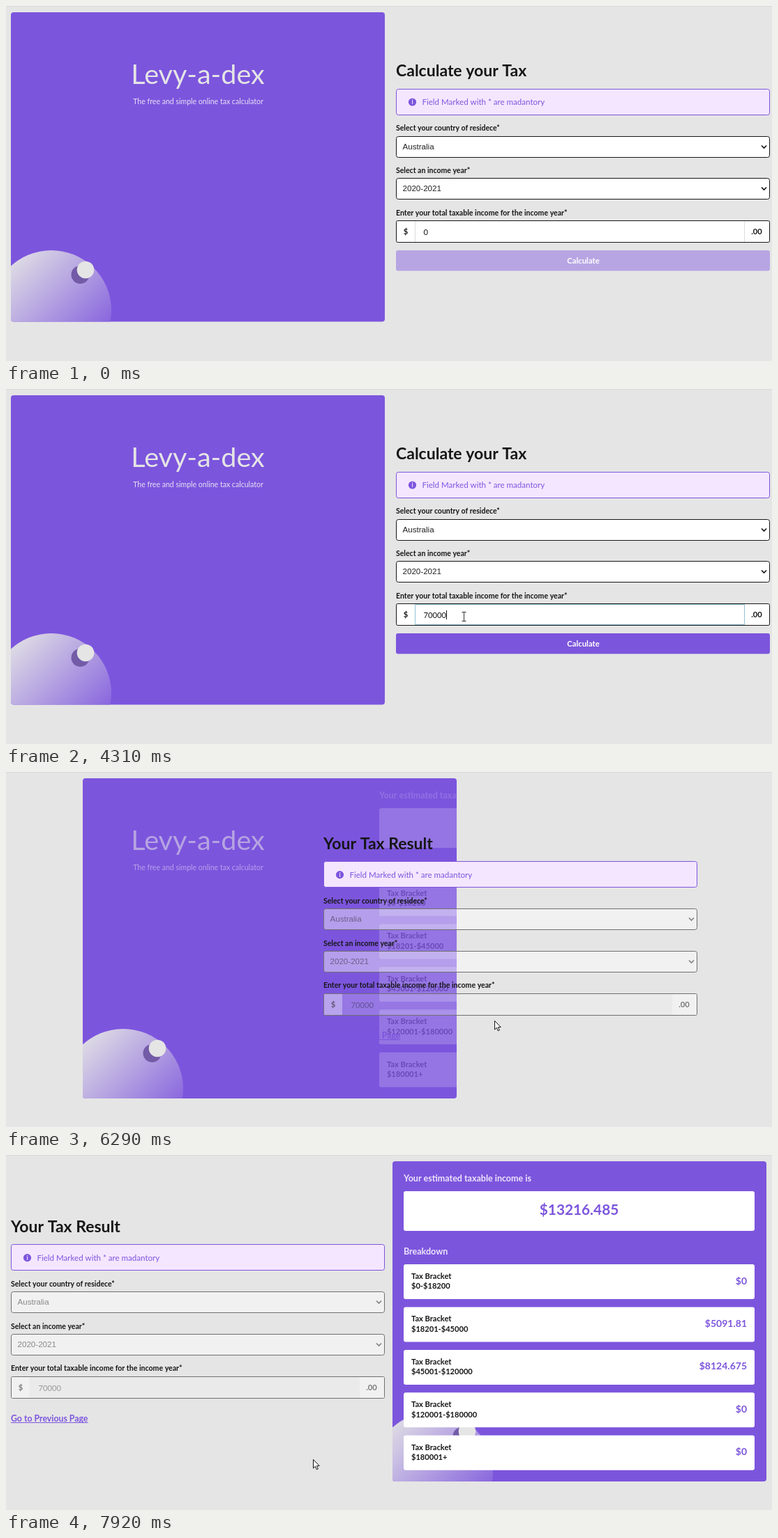
These frames come from a looping animation (1098x510 px, 7990 ms). An HTML page with a canvas:

```html
<!DOCTYPE html>
<html lang="en">
<head>
<meta charset="utf-8">
<title>Tax calculator</title>
<style>
html, body { margin: 0; width: 100%; height: 100%; overflow: hidden; background: #e5e5e5; }
canvas { display: block; }
</style>
</head>
<body>
<canvas id="stage" width="1098" height="510"></canvas>
<script>
const stage = document.getElementById('stage');
const layer = document.createElement('canvas');
layer.width = stage.width;
layer.height = stage.height;
let ctx = stage.getContext('2d');

const LOOP = 7990;
const PURPLE = '#7c55dd', INK = '#161616', GREY = '#e5e5e5';
const SLIDE = { start: 5951, length: 1107 };
const W = 536;
const DIM = .5;

const clamp = v => Math.max(0, Math.min(1, v));
const mix = (a, b, k) => a + (b - a) * k;
const ease = k => k < .5 ? 2 * k * k : 1 - 2 * (1 - k) * (1 - k);
const span = (t, a, b) => clamp((t - a) / (b - a));
const tick = t => 6290 + Math.floor((t - 6290) / 70) * 70;

function text(str, x, y, size, o = {}) {
  ctx.font = `${o.weight || 400} ${size}px ${o.family || 'Lato, sans-serif'}`;
  ctx.textAlign = o.align || 'left';
  ctx.fillStyle = o.color || INK;
  ctx.fillText(str, x, y + size * .36);
}
const bold = (str, x, y, size, color, align) => text(str, x, y, size, { weight: 700, color, align });

function box(x, y, w, h, r, fill, stroke) {
  ctx.beginPath();
  ctx.roundRect(x, y, w, h, r);
  if (fill) { ctx.fillStyle = fill; ctx.fill(); }
  if (stroke) { ctx.strokeStyle = stroke; ctx.lineWidth = 1; ctx.stroke(); }
}
// Box whose one pixel border lies inside the given size.
const framed = (x, y, w, h, r, fill, stroke) => box(x + .5, y + .5, w - 1, h - 1, r, fill, stroke);

function disc(x, y, r, fill) {
  ctx.beginPath();
  ctx.arc(x, y, r, 0, Math.PI * 2);
  ctx.fillStyle = fill;
  ctx.fill();
}

// Fades everything drawn as one group.
function faded(alpha, draw) {
  if (alpha <= 0) return;
  if (alpha >= 1) return draw();
  const main = ctx;
  ctx = layer.getContext('2d');
  ctx.clearRect(0, 0, layer.width, layer.height);
  draw();
  ctx = main;
  ctx.globalAlpha = alpha;
  ctx.drawImage(layer, 0, 0);
  ctx.globalAlpha = 1;
}

function line(points, color, width, close, fill) {
  ctx.beginPath();
  points.forEach(([x, y]) => ctx.lineTo(x, y));
  if (close) ctx.closePath();
  if (fill) { ctx.fillStyle = fill; ctx.fill(); }
  ctx.strokeStyle = color;
  ctx.lineWidth = width;
  ctx.stroke();
}

function planet(x, y) {
  const g = ctx.createLinearGradient(x - 86, y - 86, x + 86, y + 86);
  g.addColorStop(0, GREY);
  g.addColorStop(.75, PURPLE);
  g.addColorStop(.75, PURPLE);
  const soft = ctx.createLinearGradient(x - 72, y - 72, x + 68, y + 68);
  soft.addColorStop(0, GREY);
  soft.addColorStop(1, PURPLE);
  disc(x, y, 86, soft);
  disc(x + 41.5, y - 51, 13, '#735ba8');
  disc(x + 49, y - 58, 12.3, GREY);
}

const BRACKETS = [
  ['$0-$18200', '$0'], ['$18201-$45000', '$5091.81'], ['$45001-$120000', '$8124.675'],
  ['$120001-$180000', '$0'], ['$180001+', '$0']
];

function results(x) {
  const light = '#eee6fb';
  bold('Your estimated taxable income is', x, 33, 12.5, light);
  box(x, 52, 503, 57, 3, '#fff');
  bold('$13216.485', x + 251.5, 78.5, 20.8, PURPLE, 'center');
  bold('Breakdown', x, 138, 12.5, light);
  BRACKETS.forEach(([range, tax], i) => {
    const y = 157 + i * 61.45;
    box(x, y, 503, 50, 3, '#fff');
    bold('Tax Bracket', x + 11, y + 17, 11.1);
    bold(range, x + 11, y + 31.3, 11.1);
    bold(tax, x + 492, y + 23.5, 14, PURPLE, 'right');
  });
}

function panel(t, p, done) {
  const x = Math.round(mix(7, 553.5, p));
  ctx.save();
  ctx.beginPath();
  ctx.roundRect(x, 9, W, done ? 460 : 444.5, 4);
  ctx.clip();
  ctx.fillStyle = PURPLE;
  ctx.fillRect(x, 9, W, 460);
  planet(x + 58, done ? 455 : 437);
  faded(1 - span(t, 5930, 6730), () => {
    text('Levy-a-dex', 275, 98, 39.5, { color: GREY, align: 'center' });
    text('The free and simple online tax calculator', 275.5, 137, 10.55, { color: '#e9e2f6', align: 'center' });
  });
  faded(p, () => results(mix(526.8, 570, p)));
  ctx.restore();
}

function select(value, x, y, done) {
  framed(x, y, W, 31, 3, done ? 'rgba(255,255,255,.43)' : '#fff', done ? '#707070' : INK);
  faded(done ? DIM : 1, () => {
    text(value, x + 9.5, y + 15.2, 11.6, { family: 'Liberation Sans, Arial, sans-serif', color: '#222' });
    line([[x + 524, y + 13.5], [x + 527.5, y + 17], [x + 531, y + 13.5]], INK, 1.7);
  });
}

function incomeValue(t) {
  if (t < 2320) return '0';
  if (t < 2850) return '';
  return '70000'.slice(0, 1 + [3640, 3850, 4110, 4310].filter(k => t >= k).length);
}

const caretShown = t => [[1540, 2050], [2580, 3380], [3640, 4840], [5370, 5900]].some(([a, b]) => t >= a && t < b);

function income(t, x, y, done) {
  const focus = t >= 1540 && !done, value = incomeValue(t);
  if (done) {
    framed(x, y, W, 32, 2, 'rgba(255,255,255,.2)', '#707070');
    ctx.fillStyle = 'rgba(255,255,255,.32)';
    ctx.fillRect(x + 1, y + 1, 26, 30);
    ctx.fillRect(x + 500, y + 1, 35, 30);
  } else {
    framed(x, y, W, 32, 2, '#fff', INK);
    ctx.fillStyle = '#dcdcdc';
    ctx.fillRect(x + 27, y + 1, 1, 30);
    ctx.fillRect(x + 499, y + 1, 1, 30);
    if (focus) framed(x + 27, y + 1, 473, 30, 0, null, '#92c3d4');
  }
  faded(done ? .55 : 1, () => {
    bold('$', x + 14, y + 16, 11.2, INK, 'center');
    bold('.00', x + 517, y + 16, 11.2, INK, 'center');
  });
  faded(done ? .38 : 1, () => text(value, x + 39.5, y + 16.7, 11.2));
  if (focus && caretShown(t)) {
    ctx.fillStyle = INK;
    ctx.fillRect(Math.round(x + 39.8 + value.length * 6.5), y + 10, 1, 13);
  }
}

function form(t, p, done) {
  const x = Math.round(mix(559, 7, p)), dy = done ? 9.6 : 0;
  const row = y => Math.floor(y + dy);
  bold(done ? 'Your Tax Result' : 'Calculate your Tax', x, 93 + dy, 23);
  framed(x, row(119), W, 38, 3, '#f5e6ff', PURPLE);
  disc(x + 23.5, 138 + dy, 5.6, PURPLE);
  bold('i', x + 23.5, 138 + dy, 8.5, '#f5e6ff', 'center');
  text('Field Marked with * are madantory', x + 37.5, 138.3 + dy, 11.55, { color: PURPLE });
  bold('Select your country of residece*', x, 175.5 + dy, 10.5);
  select('Australia', x, row(187), done);
  bold('Select an income year*', x, 236.3 + dy, 10.5);
  select('2020-2021', x, row(247.6), done);
  bold('Enter your total taxable income for the income year*', x, 297 + dy, 10.55);
  income(t, x, row(308.4), done);

  if (done) {
    bold('Go to Previous Page', x, 379, 12.3, PURPLE);
    ctx.fillStyle = PURPLE;
    ctx.fillRect(x, 384, 110.5, 1);
  } else {
    const fill = t < 2850 ? '#b7a5e3' : t < 5330 ? '#7c55dd' : '#7a4fe0';
    box(x, 351, W, 29.5, 3, fill);
    bold('Calculate', x + W / 2 + .5, 366, 11.3, '#fff', 'center');
  }
}

function popup(t) {
  const list = t >= 1600 && t < 2320, single = t >= 2910 && t < 4310;
  if (!list && !single) return;
  ctx.save();
  ctx.shadowColor = 'rgba(0,0,0,.4)';
  ctx.shadowBlur = 4;
  ctx.shadowOffsetY = 1;
  box(587, 341, 155, single ? 41.5 : 180, 2, '#fff');
  ctx.restore();
  const rows = single ? ['70000'] : ['70000', '50000', '80000', '40000', '90000', '60000'];
  rows.forEach((v, i) => text(v, 596, 361.5 + i * 25, 10, { family: 'Noto Sans, sans-serif' }));
}

function arrow(x, y) {
  line([[0, 0], [0, 12.5], [2.8, 9.8], [4.8, 14.3], [6.8, 13.4], [4.9, 9.2], [8.7, 9]]
    .map(([a, b]) => [x + .5 + a, y + .5 + b]), '#111', 1, true, '#fff');
}

function hand(x, y) {
  line([[-1.5, 0], [1, 0], [1.3, 6], [3.5, 5.6], [4, 6.6], [6, 6.2], [6.6, 7.4], [8, 7.5],
    [8.3, 13], [6.8, 16], [6.8, 18.5], [-1, 18.5], [-2, 15.5], [-5, 11], [-4.3, 9.4], [-1.5, 11.5]]
    .map(([a, b]) => [x + a, y + b]), '#111', 1, true, '#fff');
  line([[x + 1.5, y + 6], [x + 1.5, y + 10]], '#111', .8);
  line([[x + 4, y + 7], [x + 4, y + 10]], '#111', .8);
}

function beam(x, y) {
  line([[x, y - 6], [x, y + 6]], '#333', 1);
  [-6.5, 6.5].forEach(d => line([[x - 3, y + d], [x + 3, y + d]], '#333', 1));
}

// Keys: time, x, y of the hot spot.
const PATH = [
  [300, 898, 483], [1070, 682, 357], [1350, 656.5, 327], [4790, 656.5, 327],
  [5470, 698.5, 353], [5540, 700, 357], [7725, 700, 357], [7890, 440, 437]
];

function pointer(t, done) {
  if (t < PATH[0][0]) return;
  let i = PATH.findIndex(k => k[0] > t);
  if (i < 0) i = PATH.length;
  const a = PATH[i - 1], b = PATH[i] || a;
  const k = a === b ? 0 : ease(span(t, a[0], b[0]));
  const x = mix(a[1], b[1], k), y = mix(a[2], b[2], k);
  const glow = (from, to, px, py) => {
    if (t >= from && t < to) disc(px, py, 9.5, '#f6f05a');
  };
  glow(1390, 1590, 654.5, 326.5);
  glow(5600, 5800, 700, 357);
  if (done || y > 381) arrow(x, y);
  else if (y > 350) (t < 2850 ? arrow : hand)(x, y);
  else beam(x, y);
}

function render(t) {
  const m = tick(t), done = m >= SLIDE.start;
  const p = ease(clamp((m - SLIDE.start) / SLIDE.length));
  ctx.fillStyle = GREY;
  ctx.fillRect(0, 0, 1098, 510);
  ctx.fillStyle = '#dadada';
  ctx.fillRect(0, 0, 1098, 1);
  panel(m, p, done);
  form(t, p, done);
  popup(t);
  pointer(t, done);
}

let begin;
function frame(now) {
  if (begin === undefined) begin = now;
  render((now - begin) % LOOP);
  requestAnimationFrame(frame);
}
render(0);
requestAnimationFrame(frame);
</script>
</body>
</html>
```
